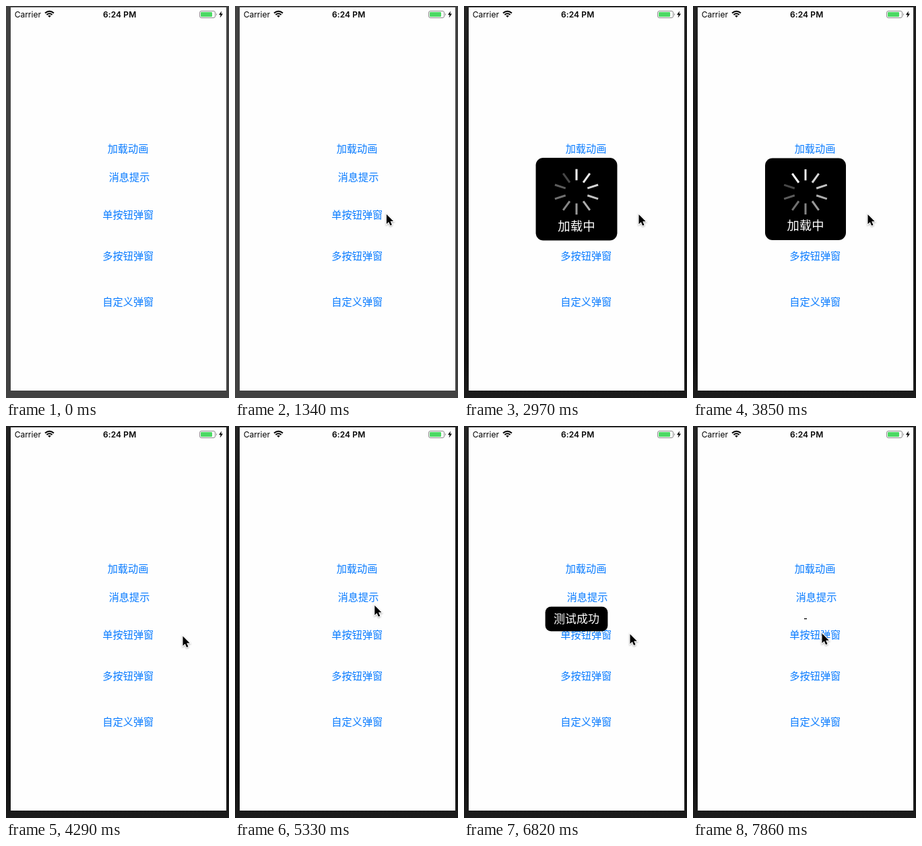
Recreate the animation shown at these times as an HTML page. Size 331 px wide and 581 px high, loop 8 s.

```html
<!DOCTYPE html>
<html lang="zh">
<head>
<meta charset="utf-8">
<title>弹窗演示</title>
<style>
  html, body { margin: 0; width: 100%; height: 100%; overflow: hidden; background: #424242; }
  svg { display: block; width: 331px; height: 581px; }
  text { text-anchor: middle; font-family: "Noto Sans CJK SC", "Noto Sans CJK", sans-serif; }
  .status { font: 12px Inter, Roboto, sans-serif; }
  .link { font-size: 15.2px; fill: #087bff; }
  .popup text { fill: #fff; }
</style>
</head>
<body>
<svg viewBox="0 0 331 581">
  <defs>
    <linearGradient id="shade" x2="0" y2="1">
      <stop offset="0" stop-color="#242424"/>
      <stop offset=".25" stop-color="#161616"/>
      <stop offset=".9" stop-color="#121212"/>
      <stop offset="1" stop-color="#1c1c1c"/>
    </linearGradient>
  </defs>
  <rect width="331" height="581" fill="#424242"/>
  <rect id="active" width="331" height="581" fill="url(#shade)"/>
  <rect x="7" y="2" width="320" height="568" fill="#fefefe"/>

  <text class="status" x="32.3" y="16.6">Carrier</text>
  <text class="status" x="168.7" y="16.6" style="font-weight:600;letter-spacing:.1px">6:24 PM</text>
  <g fill="none" stroke="#000" stroke-width="2">
    <path d="M58 10.6Q64.5 5 71 10.6M60.4 13Q64.5 9.6 68.6 13"/>
    <path d="M62.2 14.6Q64.5 12.8 66.8 14.6L64.5 17Z" fill="#000" stroke="none"/>
  </g>
  <rect x="287.5" y="7.5" width="23" height="10" rx="2.5" fill="none" stroke="#8a8a8a"/>
  <rect x="289" y="9" width="17" height="7" rx="1" fill="#4cd964"/>
  <path d="M312 10.5q2 2 0 4z" fill="#8a8a8a"/>
  <path d="M320 7.5L316 13h2.6l-1 4.5L322 11.6h-2.7z"/>

  <g class="link">
    <text id="loadingLink" x="181" y="217">加载动画</text>
    <text id="toastLink" x="183" y="259">消息提示</text>
    <text x="181.3" y="315">单按钮弹窗</text>
    <text x="181.3" y="376">多按钮弹窗</text>
    <text x="181.3" y="444">自定义弹窗</text>
  </g>
  <g id="loading" class="popup">
    <rect x="107" y="225.5" width="120" height="121.5" rx="11"/>
    <g id="spokes" stroke="#fff" stroke-width="3"></g>
    <text x="167" y="332.2" font-size="18.3">加载中</text>
  </g>
  <g id="toast" class="popup">
    <rect x="120.6" y="267.8" width="92.8" height="36.4" rx="8.5"/>
    <text x="167" y="292" font-size="17">测试成功</text>
  </g>
  <rect id="alert" x="165" y="285" width="4" height="1.3"/>
  <path id="cursor" d="M0 0V14.2L3.3 11.2L5.6 16.5L8 15.5L5.7 10.3H10.2Z"
        stroke="#fff" stroke-width="2" paint-order="stroke"
        style="filter:drop-shadow(0 1px 1px #0005)"/>
</svg>
<script>
// The screen refreshes once per beat; all times below count beats.
const BEAT = 147.9, LOOP = 8000, SPOKES = 10;
const $ = id => document.getElementById(id);
const clamp = v => Math.min(1, Math.max(0, v));
const smooth = p => p * p * (3 - 2 * p);

const spokes = Array.from({ length: SPOKES }, (_, i) => {
  const spoke = document.createElementNS('http://www.w3.org/2000/svg', 'path');
  spoke.setAttribute('d', 'M0-17V-33.5');
  spoke.setAttribute('transform', `translate(167 275.5) rotate(${i * 360 / SPOKES})`);
  return $('spokes').appendChild(spoke);
});

const popups = [
  { name: 'loading', open: 14, close: 27 },
  { name: 'toast', open: 39, close: 46 }
];

const glides = [
  { from: 3, to: 12, x: 186, y: 215.5 },
  { from: 15, to: 20, x: 259.5, y: 309 },
  { from: 27, to: 29, x: 262.5, y: 311.5 },
  { from: 32, to: 38, x: 188, y: 250 },
  { from: 41, to: 46, x: 246.5, y: 308.5 },
  { from: 46, to: 51, x: 191.5, y: 307.5 }
];

function cursorAt(beat) {
  let x = 336, y = 575;
  for (const glide of glides) {
    const p = smooth(clamp((beat - glide.from) / (glide.to - glide.from)));
    x += (glide.x - x) * p;
    y += (glide.y - y) * p;
  }
  return `translate(${x} ${y})`;
}

const show = (node, visible) => { node.style.display = visible ? '' : 'none'; };

// Damped spring on opening, quick shrink on closing
function popupScale(age, closing) {
  if (age < 0) return 0;
  const spring = 1 - Math.exp(-.82 * age) * Math.cos(1.6 * age);
  return Math.max(.015, spring) * clamp(1 - .93 * closing);
}

function drawPopup({ name, open, close }, beat) {
  const scale = popupScale(beat - open, beat - close);
  show($(name), scale > 0);
  $(name).setAttribute('transform', `translate(167 286) scale(${scale}) translate(-167 -286)`);
  $(name + 'Link').style.opacity = beat < open ? 1 : clamp(.2 + .55 * (beat - open));
}

function draw(time) {
  const beat = Math.floor(time / BEAT);
  show($('active'), beat >= 14);
  show($('alert'), beat >= 53);
  popups.forEach(popup => drawPopup(popup, beat));
  const turn = Math.floor(beat * 1.5) % SPOKES;
  spokes.forEach((spoke, i) => {
    spoke.style.opacity = 1 - .08 * ((i - turn + SPOKES) % SPOKES);
  });
  $('cursor').setAttribute('transform', cursorAt(beat));
}

const began = performance.now();
function tick() {
  draw((performance.now() - began) % LOOP);
  requestAnimationFrame(tick);
}
tick();
</script>
</body>
</html>
```
